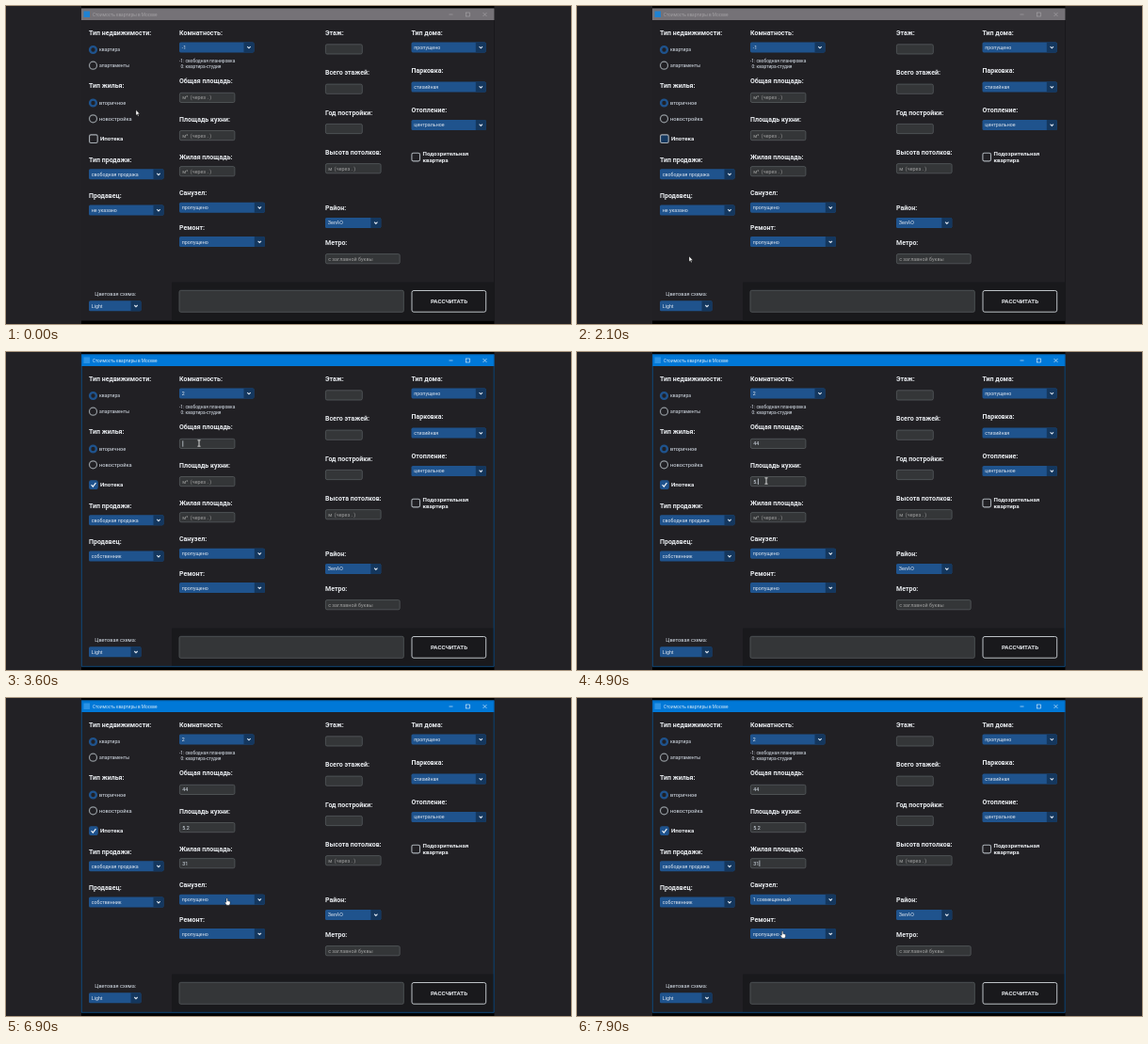
These frames come from a looping animation (600x338 px, 8000 ms). An HTML page with a canvas:

```html
<!DOCTYPE html>
<html lang="ru">
<head>
<meta charset="utf-8">
<style>
html, body { margin: 0; width: 100%; height: 100%; overflow: hidden; background: #222125; }
canvas { display: block; width: 600px; height: 338px; }
</style>
</head>
<body>
<canvas></canvas>
<script>
const canvas = document.querySelector('canvas');
const ctx = canvas.getContext('2d');
const ratio = window.devicePixelRatio || 1;
canvas.width = 600 * ratio;
canvas.height = 338 * ratio;

const LOOP = 8000, STEP = 100, ROW = 10;
const BLUE = '#1f538d', NAVY = '#14375e', BG = '#212024', TEXT = '#dce4ee', WHITE = '#fff';

// Pointer moves: departure, arrival, x, y
const moves = [
  [200, 600, 470, 306], [600, 1000, 390, 229], [1000, 1600, 112, 250],
  [1700, 2000, 94, 141], [2000, 2100, 119, 266], [2100, 2200, 94, 140],
  [2200, 2400, 118, 239], [2500, 2800, 195.5, 76], [2800, 2900, 196, 86],
  [3000, 3300, 205, 97], [4000, 4400, 201, 137], [5100, 5400, 205, 175],
  [6100, 6300, 224, 214], [6300, 6500, 222, 162], [6800, 6900, 234, 213],
  [7300, 7600, 222, 152], [7700, 7900, 217.5, 248]
];

const rooms = ['-1', '0', '1', '2', '3', '4', '5', '6'];
const sellers = ['не указано', 'собственник', 'застройщик', 'агент'];
const baths = [];
for (let i = 1; i <= 4; i++) {
  const joint = `${i} совмещенны${i > 1 ? 'х' : 'й'}`;
  baths.push(joint, `${i} раздельны${i > 1 ? 'х' : 'й'}`);
  for (let j = 1; j <= 4; j++) baths.push(`${joint}, ${j} раздельны${j > 1 ? 'х' : 'й'}`);
}
baths.push('пропущено');

const within = (t, from, to) => t >= from && t < to;

function pointerAt(t) {
  let x = 138, y = 110.5;
  for (const [start, end, toX, toY] of moves) {
    const k = Math.min(1, Math.max(0, (t - start) / (end - start)));
    const ease = k * k * (3 - 2 * k);
    x += (toX - x) * ease;
    y += (toY - y) * ease;
  }
  return [x, y];
}

// Undefined until the field is focused, then one more character every 250 ms
const typed = (text, t, focus) =>
  t < focus ? undefined : text.slice(0, Math.floor((t - focus) / 250));

function rect(x, y, w, h, fill) {
  ctx.fillStyle = fill;
  ctx.fillRect(x, y, w, h);
}

function rounded(x, y, w, h, fill, stroke, width = 0.8, r = 1.6) {
  ctx.beginPath();
  ctx.roundRect(x, y, w, h, r);
  if (fill) { ctx.fillStyle = fill; ctx.fill(); }
  if (stroke) { ctx.strokeStyle = stroke; ctx.lineWidth = width; ctx.stroke(); }
}

function line(points, color, width) {
  ctx.beginPath();
  points.forEach(([x, y]) => ctx.lineTo(x, y));
  ctx.strokeStyle = color;
  ctx.lineWidth = width;
  ctx.stroke();
}

function label(text, x, y, size, color = TEXT, weight = 400, family = 'Roboto') {
  ctx.font = `${weight} ${size}px ${family}, sans-serif`;
  ctx.fillStyle = color;
  ctx.fillText(text, x, y + size * 0.35);
}

const bold = (text, x, y, size = 7) => label(text, x, y, size, '#e8ebef', 700);

function select(text, x, y, w) {
  rounded(x, y, w, 11, BLUE);
  rounded(x + w - 11, y, 11, 11, NAVY, null, 0, [0, 1.6, 1.6, 0]);
  const cx = x + w - 5.5, cy = y + 5.5;
  line([[cx - 1.7, cy - 0.8], [cx, cy + 0.9], [cx + 1.7, cy - 0.8]], TEXT, 1.1);
  label(text, x + 2.8, y + 5.6, 5.3);
}

function entry(x, y, w, hint, value, caret) {
  rounded(x + 0.4, y + 0.4, w - 0.8, 10.2, '#343638', '#565b5e');
  if (value === undefined) return label(hint, x + 3.2, y + 5.6, 5.4, '#9e9e9e');
  label(value, x + 3.2, y + 5.6, 5.4);
  if (caret) rect(x + 3.5 + ctx.measureText(value).width, y + 2.4, 0.7, 6.4, TEXT);
}

function selectField(title, text, x, y, w) {
  bold(title, x, y);
  select(text, x, y + 10, w);
}

function entryField(title, x, y, w, hint = '', value, caret) {
  bold(title, x, y);
  entry(x, y + 11.9, w, hint, value, caret);
}

function radio(text, y, on, size) {
  ctx.beginPath();
  ctx.arc(92.5, y, on ? 3.4 : 4, 0, 7);
  ctx.strokeStyle = on ? BLUE : '#949a9f';
  ctx.lineWidth = on ? 2.4 : 1.2;
  ctx.stroke();
  label(text, 99, y + 0.2, size);
}

function checkbox(x, y, hover, on) {
  rounded(x, y, 8.6, 8.6, on ? BLUE : hover ? NAVY : null, on ? BLUE : '#a9afb5', 1.1);
  if (on) line([[x + 2, y + 4.3], [x + 3.7, y + 6.2], [x + 6.8, y + 2.3]], WHITE, 1.1);
}

function popup(items, x, y, w, pointerY) {
  const h = items.length * ROW + 2;
  const active = Math.max(0, Math.floor((pointerY - y - 1) / ROW));
  rect(x, y, w, h, '#2b2b2b');
  rect(x, y + 1 + active * ROW, w, ROW, '#404040');
  items.forEach((item, i) => label(item, x + 9.7, y + 6.2 + i * ROW, 5.4));
  ctx.strokeStyle = '#f0f0f0';
  ctx.lineWidth = 1.5;
  ctx.strokeRect(x + 0.7, y + 0.7, w - 1.4, h - 1.4);
}

function titleBar(active) {
  const ink = active ? '#f4f8fc' : '#a9a7aa';
  rect(80, 2.5, 438.5, 12.5, active ? '#0078d7' : '#757277');
  rect(82.5, 5.5, 6.5, 6.5, active ? '#2b93e6' : '#1f82d2');
  label('Стоимость квартиры в Москве', 92, 9, 4.6, ink, 400, 'Open Sans');
  line([[470.5, 9], [474.5, 9]], ink, 0.6);
  ctx.strokeRect(488.5, 7, 4, 4);
  line([[506.5, 7], [510.5, 11]], ink, 0.6);
  line([[510.5, 7], [506.5, 11]], ink, 0.6);
}

function pointer(x, y, kind) {
  ctx.save();
  ctx.translate(x, y);
  if (kind === 'text') {
    for (const end of [-3.2, 3.2]) line([[-1.6, end], [1.6, end]], WHITE, 0.7);
    line([[0, -3.2], [0, 3.2]], WHITE, 0.8);
  } else {
    const shape = new Path2D(kind === 'hand'
      ? 'M0 0Q.8-.7 1.3 .2V2.6L4 3.3V5.4L3.2 7.2H.4L-1.6 4.6Q-1.5 3.8 0 4.2Z'
      : 'M0 0V5.8L1.3 4.6L2.2 6.7L3.1 6.3L2.2 4.2H4Z');
    ctx.fillStyle = WHITE;
    ctx.strokeStyle = '#111';
    ctx.lineWidth = 0.4;
    ctx.fill(shape);
    ctx.stroke(shape);
  }
  ctx.restore();
}

function drawForm(t) {
  const active = t >= 2200;
  rect(80, 2.5, 438.5, 332, BG);
  rect(176, 293.5, 342.5, 41, '#19191c');
  titleBar(active);
  if (active) rounded(80.3, 2.8, 437.9, 331.5, null, '#0a5a9c', 0.7, 0);

  bold('Тип недвижимости:', 88, 28.5);
  radio('квартира', 46.5, true, 5.1);
  radio('апартаменты', 63.2, false, 5.1);
  bold('Тип жилья:', 88, 85);
  radio('вторичное', 103, true, 5.7);
  radio('новостройка', 119.8, false, 5.7);
  checkbox(88.6, 136.9, t >= 2000, active);
  bold('Ипотека', 100, 141, 6.2);
  selectField('Тип продажи:', 'свободная продажа', 88, 163.2, 79.5);
  selectField('Продавец:', sellers[t >= 2500 ? 1 : 0], 88, 201.5, 79.5);
  label('Цветовая схема:', 94.3, 305.7, 5.6);
  select('Light', 88, 313.3, 55.5);

  selectField('Комнатность:', t >= 3000 ? '2' : '-1', 184, 28.4, 79.5);
  label('-1: свободная планировка', 184, 58, 4.85);
  label('0: квартира-студия', 185.5, 64, 4.85);
  const area = 'м²  (через . )';
  entryField('Общая площадь:', 184, 80, 59.3, area, typed('44', t, 3400), t < 4400);
  entryField('Площадь кухни:', 184, 120.2, 59.3, area, typed('5.2', t, 4400), t < 5600);
  bold('Жилая площадь:', 184, 160.5);
  entry(184, 170.2, 59.3, area, typed('31', t, 5600), !within(t, 6500, 7800));
  selectField('Санузел:', t >= 7800 ? baths[0] : 'пропущено', 184, 198.7, 90.8);
  selectField('Ремонт:', 'пропущено', 184, 235.1, 90.8);

  ['Этаж:', 'Всего этажей:', 'Год постройки:'].forEach((title, i) =>
    entryField(title, 339, 28.5 + i * 42.3, 39.7));
  entryField('Высота потолков:', 339, 155.3, 59.5, 'м  (через . )');
  selectField('Район:', 'ЗелАО', 339, 215, 59.3);
  entryField('Метро:', 339, 251.3, 79.6, 'с заглавной буквы');

  selectField('Тип дома:', 'пропущено', 430.5, 28.4, 79.3);
  bold('Парковка:', 430.5, 68.8);
  select('стихийная', 430.5, 80.6, 79.3);
  selectField('Отопление:', 'центральное', 430.5, 111, 79.3);
  checkbox(430.9, 156.3);
  bold('Подозрительная', 442.5, 157, 6.2);
  bold('квартира', 442.5, 164, 6.2);

  rounded(184, 302.3, 238.3, 23, '#343638', '#565b5e');
  rounded(431, 302.5, 78.7, 22.7, null, '#d0d5da', 0.9, 2);
  ctx.textAlign = 'center';
  bold('РАССЧИТАТЬ', 470.5, 313.7, 6.2);
  ctx.textAlign = 'left';
}

function draw(t) {
  const zoomed = within(t, 7000, 7800);
  ctx.setTransform(ratio, 0, 0, ratio, 0, 0);
  rect(0, 0, 600, 338, '#222125');
  rect(80, 0, 438.5, 338, '#000');
  if (zoomed) {
    const shade = ctx.createLinearGradient(0, 286, 0, 338);
    shade.addColorStop(0, '#2b2b2c');
    shade.addColorStop(1, '#3c3c3d');
    rect(110, 286, 377.5, 52, shade);
    ctx.translate(41.2, -2.3);
    ctx.scale(0.8615, 0.8615);
  }
  drawForm(t);

  const [x, y] = pointerAt(t);
  if (within(t, 2300, 2500)) popup(sellers, 88, 223, 62, y);
  if (within(t, 2700, 3000)) popup(rooms, 183.5, 50.5, 44.5, y);
  if (zoomed) popup(baths, 183.2, 143.7, 98, y);
  const overSelect = t >= 7900 || within(t, 6900, 7000);
  const overEntry = within(t, 3300, 4100) || within(t, 4400, 5900);
  pointer(x, y, overSelect ? 'hand' : overEntry ? 'text' : 'arrow');
}

function frame(now) {
  draw(Math.floor((now % LOOP) / STEP) * STEP);
  requestAnimationFrame(frame);
}
requestAnimationFrame(frame);
</script>
</body>
</html>
```
